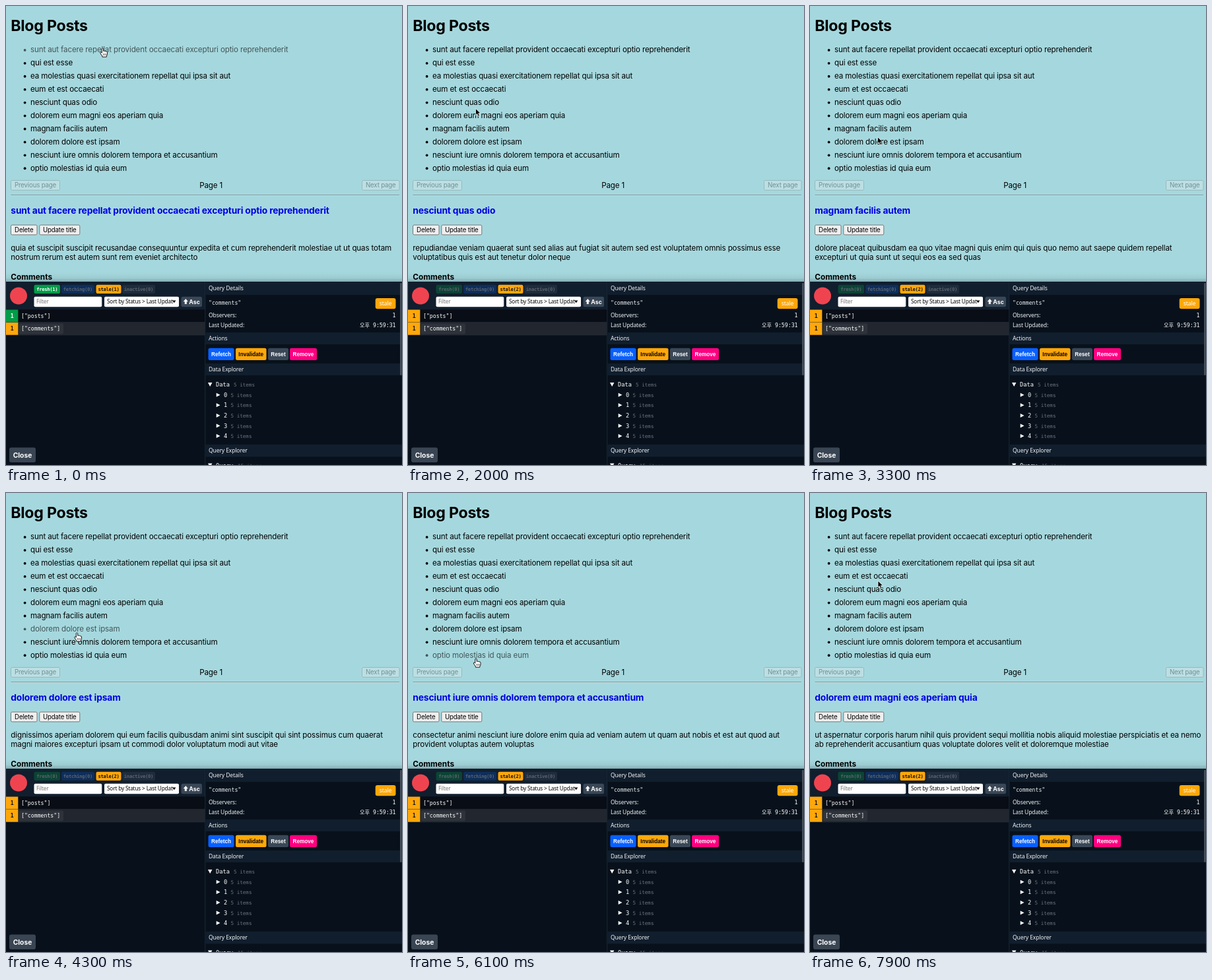
An HTML page for the animation above (8 s loop, 600 by 696 pixels).

```html
<!DOCTYPE html>
<html lang="en">
<head>
<meta charset="utf-8">
<title>Blog Posts</title>
<style>
  html, body { margin: 0; width: 100%; height: 100%; overflow: hidden; background: #a5d8de; }
  svg { display: block; width: 600px; height: 696px; }
  text { white-space: pre; font-optical-sizing: none; }
  .body { font: 400 11.6px Inter, sans-serif; letter-spacing: -.138px; }
  .h1 { font: 700 23.2px Inter, sans-serif; letter-spacing: -.28px; }
  .h3 { font: 700 13.8px Inter, sans-serif; letter-spacing: -.147px; }
  .h4 { font: 700 11.8px Inter, sans-serif; }
  .btn { font: 400 9.7px Inter, sans-serif; letter-spacing: -.175px; }
  .close { font: 700 10.3px Inter, sans-serif; }
  .asc { font: 700 8.8px Inter, sans-serif; }
  .ui { font: 400 8.6px "Noto Sans", "Noto Sans CJK KR", sans-serif; letter-spacing: -.15px; }
  .pick { font: 400 8.2px "Noto Sans", sans-serif; letter-spacing: -.14px; }
  .act { font: 700 8.2px "Liberation Sans", sans-serif; }
  .code { font: 400 8.2px "DejaVu Sans Mono", "Noto Sans CJK KR", monospace; }
  .flag { font: 700 8.2px "DejaVu Sans Mono", monospace; }
  .key { font: 400 8.7px "DejaVu Sans Mono", monospace; }
  .count { font: 400 7.6px "DejaVu Sans Mono", monospace; }
  .chip { font: 700 7.2px "DejaVu Sans Mono", monospace; letter-spacing: -.3px; }
</style>
</head>
<body>
<svg id="stage" viewBox="0 0 600 696" xmlns="http://www.w3.org/2000/svg">
  <defs>
    <linearGradient id="shade" x1="0" y1="0" x2="0" y2="1">
      <stop offset="0" stop-opacity="0"/>
      <stop offset=".6" stop-opacity=".05"/>
      <stop offset="1" stop-opacity=".2"/>
    </linearGradient>
  </defs>
</svg>
<script>
const LOOP = 8000, STEP = 100;
const stage = document.getElementById('stage');

const posts = [
  ['sunt aut facere repellat provident occaecati excepturi optio reprehenderit',
   'quia et suscipit suscipit recusandae consequuntur expedita et cum reprehenderit molestiae ut ut quas totam',
   'nostrum rerum est autem sunt rem eveniet architecto'],
  ['qui est esse',
   'est rerum tempore vitae sequi sint nihil reprehenderit dolor beatae ea dolores neque fugiat blanditiis voluptate',
   'porro vel nihil molestiae ut reiciendis qui aperiam non debitis possimus qui neque nisi nulla'],
  ['ea molestias quasi exercitationem repellat qui ipsa sit aut',
   'et iusto sed quo iure voluptatem occaecati omnis eligendi aut ad voluptatem doloribus vel accusantium quis',
   'pariatur molestiae porro eius odio et labore et velit aut'],
  ['eum et est occaecati',
   'ullam et saepe reiciendis voluptatem adipisci sit amet autem assumenda provident rerum culpa quis hic commodi',
   'nesciunt rem tenetur doloremque ipsam iure quis sunt voluptatem rerum illo velit'],
  ['nesciunt quas odio',
   'repudiandae veniam quaerat sunt sed alias aut fugiat sit autem sed est voluptatem omnis possimus esse',
   'voluptatibus quis est aut tenetur dolor neque'],
  ['dolorem eum magni eos aperiam quia',
   'ut aspernatur corporis harum nihil quis provident sequi mollitia nobis aliquid molestiae perspiciatis et ea nemo',
   'ab reprehenderit accusantium quas voluptate dolores velit et doloremque molestiae'],
  ['magnam facilis autem',
   'dolore placeat quibusdam ea quo vitae magni quis enim qui quis quo nemo aut saepe quidem repellat',
   'excepturi ut quia sunt ut sequi eos ea sed quas'],
  ['dolorem dolore est ipsam',
   'dignissimos aperiam dolorem qui eum facilis quibusdam animi sint suscipit qui sint possimus cum quaerat',
   'magni maiores excepturi ipsam ut commodi dolor voluptatum modi aut vitae'],
  ['nesciunt iure omnis dolorem tempora et accusantium',
   'consectetur animi nesciunt iure dolore enim quia ad veniam autem ut quam aut nobis et est aut quod aut',
   'provident voluptas autem voluptas'],
  ['optio molestias id quia eum',
   'quo et expedita modi cum officia vel magni doloribus qui repudiandae vero nisi sit quos veniam quod sed',
   'accusamus veritatis error']
];

// [time, selected post]
const clicks = [[0, 0], [500, 1], [1300, 2], [1600, 3], [1900, 4], [2500, 5], [3100, 6],
  [4000, 7], [5500, 8], [6300, 9], [6700, 8], [7000, 7], [7300, 6], [7600, 5]];
const STALE_AT = 1500;

// [time, x, y] of the pointer tip
const path = [[0, 146.5, 64], [100, 140, 66], [400, 90, 84], [500, 88.5, 86], [1000, 88.5, 86],
  [1200, 92, 104], [1500, 97, 124], [1600, 97, 126], [1900, 102, 147], [2000, 102.5, 155.5],
  [2300, 103, 165], [2500, 103, 167], [2900, 103, 184], [3100, 103, 187], [3300, 102.5, 198.8],
  [3700, 105, 206], [4000, 106, 207], [4800, 110, 220], [5200, 111, 223], [5500, 110, 226],
  [5800, 105, 240], [6100, 103, 251], [6300, 103, 250], [6600, 103, 227], [6900, 103, 207],
  [7200, 103, 187], [7500, 103, 168], [7600, 103, 166], [7800, 103, 150], [7900, 103, 133.2]];

function add(tag, attrs, parent = stage) {
  const node = document.createElementNS(stage.namespaceURI, tag);
  for (const name in attrs) node.setAttribute(name, attrs[name]);
  parent.appendChild(node);
  return node;
}
function box(x, y, width, height, fill, more = {}, parent) {
  return add('rect', { x, y, width, height, fill, ...more }, parent);
}
function label(x, y, cls, str, fill = '#000', more = {}, parent) {
  const node = add('text', { x, y, class: cls, fill, ...more }, parent);
  node.textContent = str;
  return node;
}
const end = { 'text-anchor': 'end' }, middle = { 'text-anchor': 'middle' };

// Page
label(7.3, 38, 'h1', 'Blog Posts');
const rowY = i => 66.3 + 19.93 * i;
const rows = posts.map(([title], i) => {
  const g = add('g', {});
  add('circle', { cx: 28.6, cy: rowY(i) + .6, r: 1.9 }, g);
  label(37, rowY(i) + 4.1, 'body', title, '#000', {}, g);
  return g;
});

function pageButton(x, y, width, str, off) {
  const g = add('g', { opacity: off ? .32 : 1 });
  box(x + .5, y + .5, width - 1, 14.8, '#efefef', { stroke: '#767676', rx: 1.8 }, g);
  label(x + width / 2, y + 11.3, 'btn', str, '#000', middle, g);
}
pageButton(7, 264, 75, 'Previous page', true);
pageButton(539, 264, 57.5, 'Next page', true);
label(310.7, 276, 'body', 'Page 1', '#000', middle);
box(7.5, 286, 588.5, 1, '#889b9e');
box(7.5, 287, 588.5, .6, '#c9e2e5');

const heading = label(7.3, 314.5, 'h3', '', '#0000e4');
pageButton(7, 331.6, 40.5, 'Delete');
pageButton(50.3, 331.6, 62, 'Update title');
const lines = [371, 385].map(y => label(7.3, y, 'body', ''));
label(7.3, 414.7, 'h4', 'Comments');

// Devtools, left side
box(0, 403, 600, 15, 'url(#shade)');
box(0, 418, 600, 278, '#08111b');
box(0, 418, 302, 42.5, '#111e2d');
add('circle', { cx: 19, cy: 439.5, r: 13, fill: '#ef4450' });

function chip(x, width, fill, ink) {
  const g = add('g', {});
  box(x, 422.7, width, 13.3, fill, { rx: 2.2 }, g);
  const text = label(x + width / 2, 432, 'chip', '', ink, middle, g);
  return (str, on) => {
    text.textContent = str;
    g.setAttribute('opacity', on ? 1 : .3);
  };
}
const fresh = chip(42.5, 39.5, '#009c48', '#fff');
chip(84, 50, '#0a55c8', '#fff')('fetching(0)', false);
const stale = chip(136.5, 38, '#ffa70a', '#111');
chip(176, 50, '#3f4e60', '#fff')('inactive(0)', false);

box(42.5, 440.7, 102.7, 15.5, '#fff', { rx: 2 });
label(46, 451.3, 'pick', 'Filter', '#777');
box(149, 440.7, 113, 15.5, '#fff', { rx: 2 });
label(153, 451.3, 'pick', 'Sort by Status > Last Updat');
add('path', { d: 'M252 446.5h5.4l-2.7 3.8z' });
box(265.5, 440.7, 31.5, 15.5, '#3a4756', { rx: 2.5 });
add('path', { d: 'M272.3 444l3.6 4.2h-2.1v3.8h-3v-3.8h-2.1z', fill: '#fff' });
label(277.3, 451.6, 'asc', 'Asc', '#fff');

box(0, 460.5, 301.5, 19, '#090d15');
box(0, 479.5, 301.5, 19.5, '#22272f');
box(0, 479.3, 301.5, .7, '#232d39');
box(0, 498.6, 301.5, .7, '#232d39');
const flag = box(0, 460.5, 18.3, 19, '#009c48');
box(0, 480, 18.3, 18.7, '#ffa70a');
const flagText = label(9.2, 472.8, 'flag', '1', '#fff', middle);
label(9.2, 492, 'flag', '1', '#111', middle);
box(20, 481.5, 67, 16, '#2e333b', { rx: 2 });
label(23, 472.6, 'code', '["posts"]', '#fff');
label(23, 491.8, 'code', '["comments"]', '#fff');

box(5, 669.5, 40, 22.5, '#3a4553', { rx: 3 });
label(25, 684.5, 'close', 'Close', '#fff', middle);

// Devtools, right side
box(301.3, 418, 1, 278, '#1d2937');
for (const [y, height, str] of [[418, 20, 'Query Details'], [495, 18, 'Actions'],
    [542, 18, 'Data Explorer'], [665, 18.5, 'Query Explorer']]) {
  box(302.3, y, 297.7, height, '#111e2d');
  label(307, y + height / 2 + 3.1, 'ui', str, '#eef1f4');
}
label(307, 453.3, 'code', '"comments"', '#eef1f4');
box(559.7, 443, 30.8, 16.3, '#ffa70a', { rx: 3 });
label(575, 454, 'ui', 'stale', '#fff', middle);
label(307, 471.8, 'ui', 'Observers:', '#eef1f4');
label(590.5, 471.8, 'code', '1', '#fff', end);
label(307, 487, 'ui', 'Last Updated:', '#eef1f4');
label(590.5, 487, 'code', '오후 9:59:31', '#fff', end);

for (const [x, width, str, fill, ink] of [[306.5, 39, 'Refetch', '#0860ff', '#fff'],
    [348, 46.5, 'Invalidate', '#ffa70a', '#000'], [397, 31, 'Reset', '#3a4756', '#fff'],
    [430, 41, 'Remove', '#ff0080', '#fff']]) {
  box(x, 518.8, width, 18.3, fill, { rx: 2.5 });
  label(x + width / 2, 530.8, 'act', str, ink, middle);
}

function branch(y, str, count, countX) {
  add('path', { d: `M306 ${y - 6}h6.4l-3.2 6z`, fill: '#fff' });
  label(318, y, 'key', str, '#fff');
  label(countX, y, 'count', count, '#6a737d');
}
branch(577, 'Data', '5 items', 345);
for (let i = 0; i < 5; i++) {
  const y = 592.7 + 15.6 * i;
  add('path', { d: `M318.7 ${y - 6}v6l5.8 -3z`, fill: '#fff' });
  label(330, y, 'key', i, '#fff');
  label(340.5, y, 'count', '5 items', '#6a737d');
}
branch(699.5, 'Query', '15 items', 351);
box(597, 420, 2.6, 140, '#47515c', { rx: 1.3 });

// Pointers, tip at the origin
const arrow = add('path', {
  d: 'M0 0v10l2.3-2.1 1.7 3.8 1.9-.8-1.6-3.7h3.2z',
  stroke: '#fff', 'stroke-width': .7
});
const hand = add('g', {});
add('path', {
  d: 'M-1.2 .8Q0-.9 1.2.8V4.4Q2.2 3.6 3.2 4.6 4.2 4 5 5 6.7 4.6 7 6.2V9Q6.8 10.8 5.8 12V13.2H-.6V12L-3.4 8Q-4.3 6.3-2.8 6-1.8 6-1.2 7.2z',
  fill: '#fff', stroke: '#000', 'stroke-width': .9, 'stroke-linejoin': 'round'
}, hand);
add('path', { d: 'M1 8v3M3 8v3M5 8v3', stroke: '#000', 'stroke-width': .6 }, hand);

function pointerAt(t) {
  const i = path.findIndex(p => p[0] > t);
  if (i < 0) return path[path.length - 1].slice(1);
  const [t0, x0, y0] = path[i - 1], [t1, x1, y1] = path[i];
  const k = (t - t0) / (t1 - t0);
  return [x0 + (x1 - x0) * k, y0 + (y1 - y0) * k];
}

function draw(t) {
  const [x, y] = pointerAt(t);
  const over = posts.findIndex((_, i) => Math.abs(y - rowY(i)) < 6.9);
  rows.forEach((row, i) => row.setAttribute('opacity', i === over ? .6 : 1));
  arrow.setAttribute('visibility', over < 0 ? 'visible' : 'hidden');
  hand.setAttribute('visibility', over < 0 ? 'hidden' : 'visible');
  for (const node of [arrow, hand]) node.setAttribute('transform', `translate(${x} ${y})`);

  const chosen = clicks.filter(c => c[0] <= t).pop()[1];
  const [title, ...text] = posts[chosen];
  heading.textContent = title;
  lines.forEach((line, i) => { line.textContent = text[i]; });

  const old = t >= STALE_AT;
  fresh(old ? 'fresh(0)' : 'fresh(1)', !old);
  stale(old ? 'stale(2)' : 'stale(1)', true);
  flag.setAttribute('fill', old ? '#ffa70a' : '#009c48');
  flagText.setAttribute('fill', old ? '#111' : '#fff');
}

const start = performance.now();
function tick() {
  const t = (performance.now() - start) % LOOP;
  draw(Math.floor(t / STEP) * STEP);
  requestAnimationFrame(tick);
}
tick();
</script>
</body>
</html>
```
